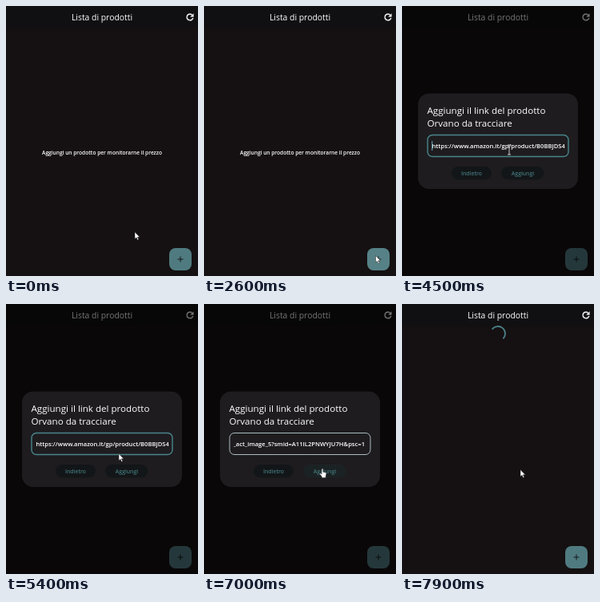
Animation, 240 px wide and 338 px high, one loop 8000 ms. Source, as an HTML page:

```html
<!DOCTYPE html>
<html lang="it">
<head>
<meta charset="utf-8">
<title>Lista di prodotti</title>
<style>
html, body { margin: 0; width: 100%; height: 100%; overflow: hidden; background: #151011; }
svg { display: block; width: 240px; height: 338px; font-family: "Open Sans", "Noto Sans", sans-serif; fill: #fff; }
.mid { text-anchor: middle; }
.small { font-size: 6.6px; font-weight: 600; }
.button { font-size: 6.8px; font-weight: 600; fill: #42757a; }
.cursor { stroke: #222; stroke-width: .5; stroke-linejoin: round; }
</style>
</head>
<body>
<svg viewBox="0 0 240 338">
  <defs>
    <clipPath id="fieldClip"><rect x="37" y="163" width="166.5" height="24"/></clipPath>
    <linearGradient id="header" x2="0" y2="1">
      <stop offset=".7" stop-color="#100f12"/><stop offset="1" stop-color="#151011"/>
    </linearGradient>
  </defs>
  <rect width="240" height="338" fill="#151011"/>
  <rect width="240" height="32" fill="url(#header)"/>
  <text class="mid" x="120" y="18.4" font-size="10.4">Lista di prodotti</text>
  <path transform="translate(223.4 7.4) scale(.55)" stroke="#fff" stroke-width=".5" d="M17.65 6.35A7.96 7.96 0 0 0 12 4a8 8 0 1 0 7.73 10h-2.08A6 6 0 1 1 12 6c1.66 0 3.14.69 4.22 1.78L13 11h7V4z"/>
  <text id="hint" class="mid small" x="120" y="186.3">Aggiungi un prodotto per monitorarne il prezzo</text>
  <path id="spinner" fill="none" stroke="#4a7f85" stroke-width="1.8"/>
  <rect id="fab" x="204" y="303" width="28" height="28" rx="8"/>
  <path d="M214.5 317h7M218 313.5v7" stroke="#15191a"/>

  <g id="overlay">
    <rect width="240" height="338" fill="#000" opacity=".54"/>
    <rect x="20" y="109.5" width="200" height="119.5" rx="14" fill="#1e1c1f"/>
    <g font-size="11.6">
      <text x="31.5" y="135">Aggiungi il link del prodotto</text>
      <text x="31.5" y="150.7">Orvano da tracciare</text>
    </g>
    <rect id="field" x="32" y="161.5" width="176" height="27" rx="6" fill="none"/>
    <g clip-path="url(#fieldClip)">
      <text id="url" y="178" font-size="7.6" font-weight="600">https://www.amazon.it/gp/product/B0BBJDS4K7/ref=ox_sc_act_image_5?smid=A11IL2PNWYJU7H&amp;psc=1</text>
    </g>
    <rect id="caret" y="169" width="1.2" height="12" fill="#5b979d"/>
    <rect x="62" y="201" width="50" height="16.5" rx="8.2" fill="#131618"/>
    <rect id="add" x="124" y="201" width="53.5" height="16.5" rx="8.2"/>
    <text class="button mid" x="87" y="212">Indietro</text>
    <text class="button mid" x="151" y="212">Aggiungi</text>
  </g>

  <g id="pointer">
    <path id="arrow" class="cursor" d="M0 0V8.6L2 6.8 3.4 9.9 4.8 9.3 3.4 6.3H6.1Z"/>
    <path id="hand" class="cursor" d="M-.9.6Q0-.6.9.6V4.2L4 5Q5 5.3 4.9 6.5L4.2 9.5V11.5H-.8V10L-3.4 6.8Q-3.4 5.3-2.2 5.8L-.9 7Z"/>
    <path id="beam" fill="none" stroke="#ddd" stroke-width=".9" d="M-2-6H2M0-6V6M-2 6H2"/>
  </g>
</svg>
<script>
const $ = id => document.getElementById(id);
const set = (id, attrs) => { for (const k in attrs) $(id).setAttribute(k, attrs[k]); };
const show = (id, on) => set(id, { opacity: +on });
const within = (t, a, b) => t >= a && t < b;
const ramp = (t, a, b) => Math.min(1, Math.max(0, (t - a) / (b - a)));
const smooth = p => p * p * (3 - 2 * p);

// Pointer path: time, x, y
const path = [
  [1300, 161, 283], [1400, 160.5, 281.5], [1600, 155, 273], [2200, 197, 297],
  [2600, 214.5, 312.5], [3100, 214.5, 312.5], [3700, 145.5, 204], [3800, 138, 190],
  [4000, 134, 180], [4600, 134, 180], [5000, 141, 187.5], [5400, 141, 187.5],
  [5800, 229, 185], [6200, 148, 206], [7100, 148, 206], [7300, 148, 207.5]
];

function pointerAt(t) {
  const i = path.findIndex(p => p[0] >= t);
  if (i < 0) return path[path.length - 1].slice(1);
  if (i === 0) return path[0].slice(1);
  const [a, b] = [path[i - 1], path[i]];
  const p = ramp(t, a[0], b[0]);
  return [1, 2].map(k => a[k] + (b[k] - a[k]) * p);
}

function arc(from, to) {
  const point = deg => {
    const r = deg * Math.PI / 180;
    return `${120 + 9 * Math.cos(r)} ${37 + 9 * Math.sin(r)}`;
  };
  return `M${point(from)}A9 9 0 ${+(to - from > 180)} 1 ${point(to)}`;
}

function draw(t) {
  const [x, y] = pointerAt(t);
  const hand = within(t, 3600, 3800) || within(t, 6100, 7200);
  const beam = within(t, 3900, 4800);
  set('pointer', { transform: `translate(${x} ${y})` });
  show('arrow', !hand && !beam);
  show('hand', hand);
  show('beam', beam);

  set('overlay', { opacity: ramp(t, 3100, 3300) * (1 - ramp(t, 7050, 7250)) });
  set('fab', { fill: within(t, 2500, 3300) ? '#568287' : '#4f7b80' });
  set('add', { fill: hand ? '#1b2224' : '#131618' });

  const focused = within(t, 4400, 7000);
  set('field', {
    stroke: focused ? '#47858b' : t >= 7000 ? '#a9bcbe' : '#e8e8e8',
    'stroke-width': focused ? 1.4 : 1
  });
  const scroll = smooth(ramp(t, 5400, 5900));
  const overflow = $('url').getComputedTextLength() - 163.5;
  set('url', { x: 37.5 - overflow * scroll });
  show('url', t >= 4500);
  set('caret', { x: t < 5000 ? 37 : 201.5 });
  show('caret', within(t, 4400, 4900) || within(t, 6000, 6500));

  show('hint', t < 7200);
  show('spinner', t >= 7200);
  set('spinner', { d: arc(-145 + (t - 7900) * .2, 45 + (t - 7900) * .36) });
}

function frame() {
  draw(Math.floor(performance.now() % 8000 / 100) * 100);
  requestAnimationFrame(frame);
}
frame();
</script>
</body>
</html>
```
